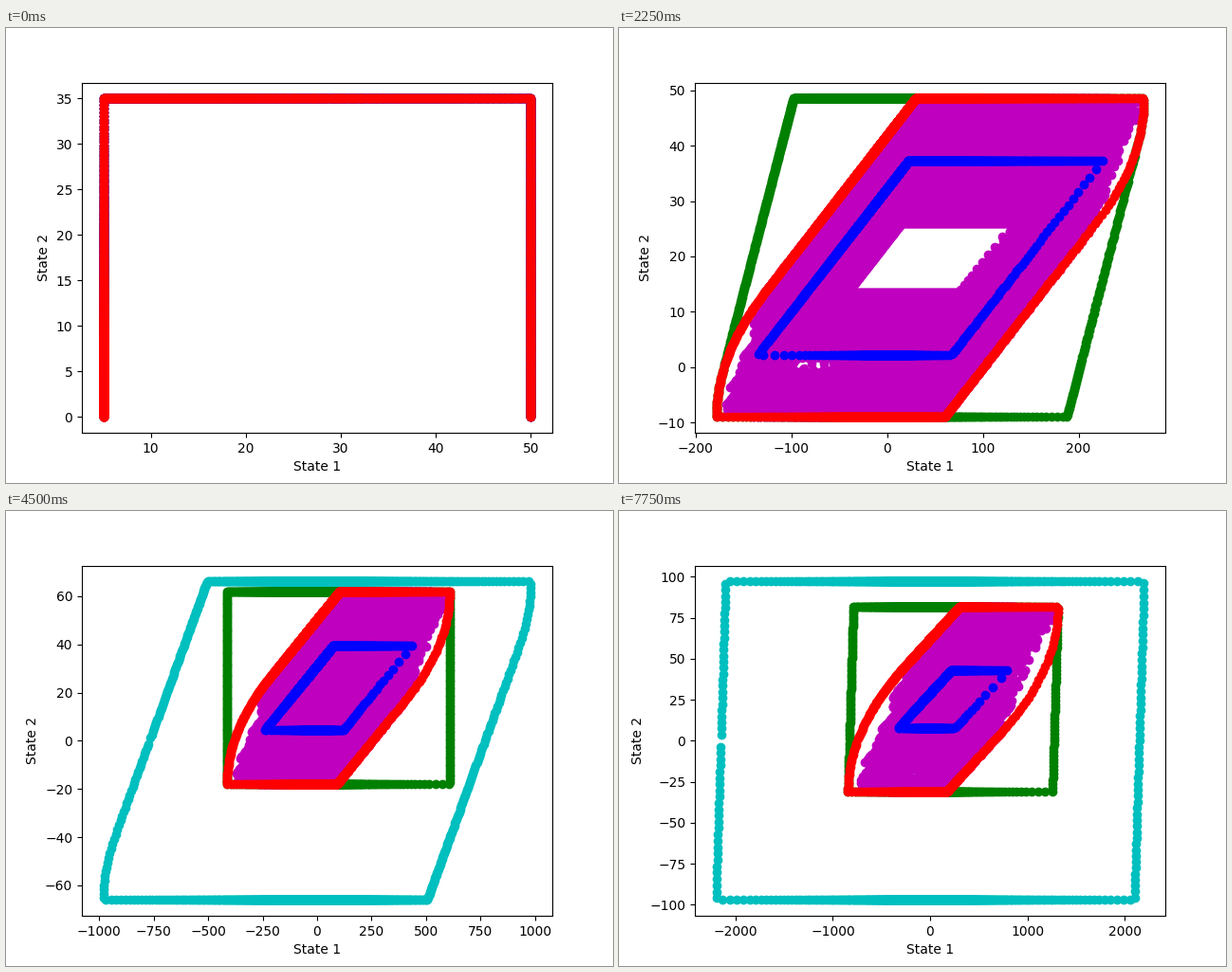
A matplotlib script that plays this animation: 640x480 px, repeating every 8000 ms.

```python
import numpy as np
import matplotlib.pyplot as plt
from matplotlib.animation import FuncAnimation

STEPS, INTERVAL = 32, 250
DT = 0.5
GREEN_PERIOD, CYAN_PERIOD = 6, 10

angles = np.radians(0.1 * np.arange(-1799, 1800))
RAYS = np.column_stack([np.cos(angles), np.sin(angles)])

# Disturbance samples (velocity part, position part), both in [-1, 1]
rng = np.random.default_rng(4)
NOISE = np.vstack([[(1, -1), (-1, 1)], rng.uniform(-1, 1, (100, 2))])

# Cyan set at each reset: half width, its growth, half height, its growth
CYAN = {1: (500, 54, 52.95, 1.64),
        2: (1177, 74, 73.1, 1.68),
        3: (2105, 93, 95.4, 1.7)}


def zonotope(center, width, height, age, push):
    """Sheared box of a given age, widened by one generator per step."""
    j = np.arange(age if push else 0)
    gens = np.column_stack([push * DT * (j + 0.5), np.full(len(j), push)])
    gens = np.vstack([gens, (DT * age * height, height)])
    gens = np.vstack([gens, (width - gens[:, 0].sum(), 0)])
    sides = 2 * np.vstack([gens, -gens])
    start = np.asarray(center) - gens.sum(axis=0)
    return start + np.cumsum(sides, axis=0)


def ray_hits(poly):
    """Points where rays from the origin cross the polygon's edges."""
    dx, dy = RAYS.T
    points = []
    with np.errstate(divide="ignore", invalid="ignore"):
        for p, q in zip(poly, np.roll(poly, -1, axis=0)):
            ex, ey = q - p
            t = -(p[0] * dy - p[1] * dx) / (ex * dy - ey * dx)
            x, y = p[0] + t * ex, p[1] + t * ey
            ok = (t >= 0) & (t <= 1) & (x * dx + y * dy > 0)
            points.append(np.column_stack([x[ok], y[ok]]))
    return np.vstack(points)


def thin(points, span):
    """Keep one point per small cell, about one pixel wide."""
    cell = np.round((points - points.min(axis=0)) / span * [450, 336])
    key = (cell[:, 0] * 1000 + cell[:, 1]).astype(np.int64)
    return points[np.unique(key, return_index=True)[1]]


def cyan_set(k):
    n, age = divmod(k, CYAN_PERIOD)
    width, widen, height, push = CYAN[n]
    width += widen * age + 0.77 * age ** 2
    return zonotope((0, 0), width, height, age, push)


fig, ax = plt.subplots(figsize=(6.4, 4.8), dpi=100)


def update(k):
    ax.clear()
    center = np.array([27.5 + 0.216 * k ** 2, 17.5 + 0.25 * k])
    width = 22.5 + 17.5 * k
    full = width + 0.535 * k ** 2
    age = k % GREEN_PERIOD

    nominal = zonotope(center, width, 17.5, k, 0)
    red = zonotope(center, full, 17.5, k, 1.25)
    green = zonotope(center, full, 17.5 + 1.25 * (k - age), age, 1.25)
    outer = red

    if k > CYAN_PERIOD:
        outer = cyan_set(k)
        ax.plot(*ray_hits(outer).T, "co")
    ax.plot(*ray_hits(green).T, "go")

    w, v = NOISE.T
    shifts = np.column_stack([(0.3125 * w + 0.2225 * v) * k ** 2, 1.25 * k * w])
    cloud = np.vstack([ray_hits(nominal + s) for s in shifts])
    ax.plot(*thin(cloud, np.ptp(outer, axis=0)).T, "mo")

    ax.plot(*ray_hits(nominal).T, "bo")
    ax.plot(*ray_hits(red).T, "ro")
    ax.set_xlabel("State 1")
    ax.set_ylabel("State 2")
    return ax.lines


anim = FuncAnimation(fig, update, frames=STEPS, interval=INTERVAL,
                     init_func=lambda: [], repeat=True, repeat_delay=0)
plt.show()
```
